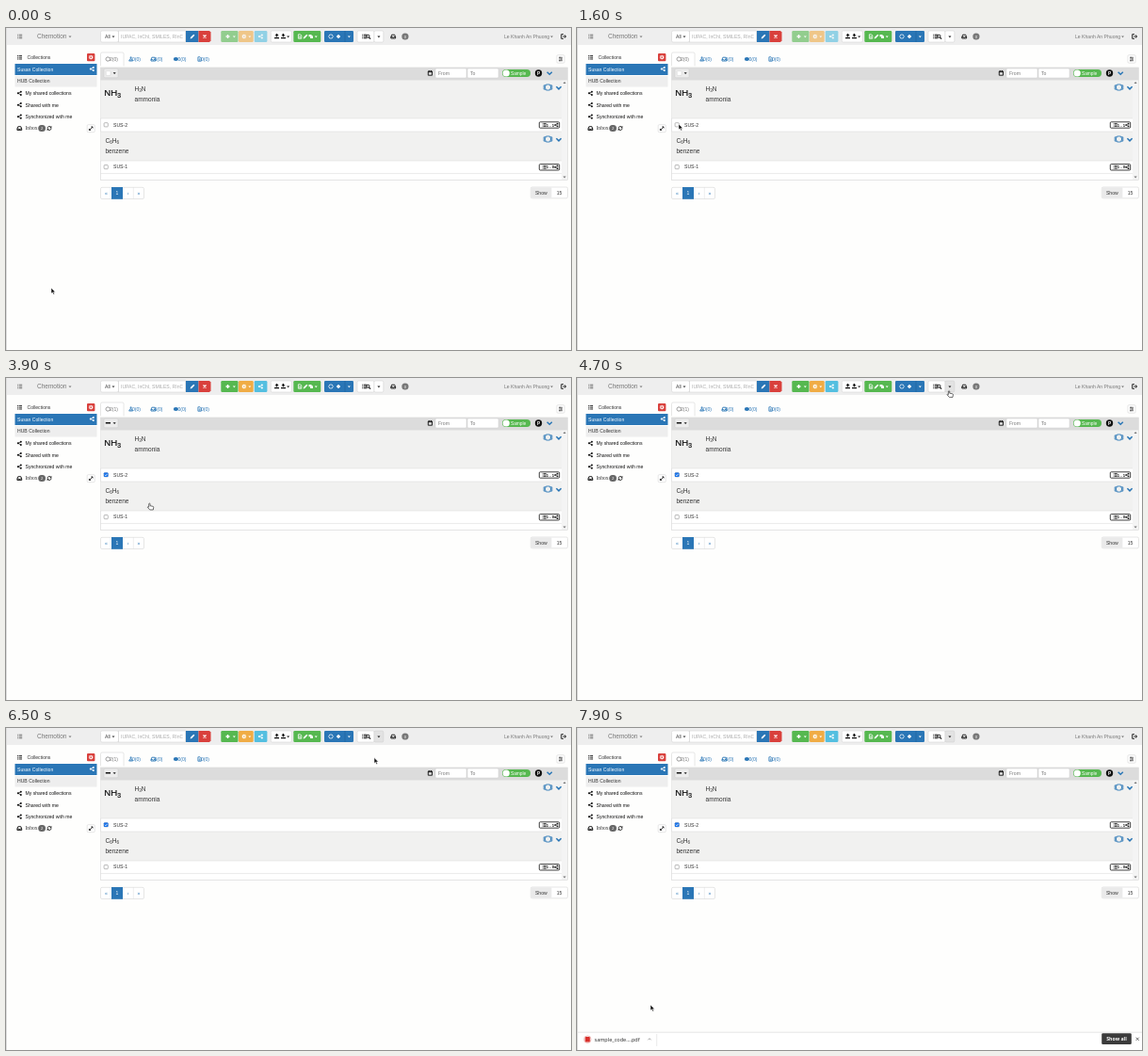
Recreate the animation shown at these times as an HTML page. Size 600 by 342 pixels, loop 8000 ms.

```html
<!DOCTYPE html>
<html lang="en">
<head>
<meta charset="utf-8">
<title>Sample labels</title>
<style>
html, body { margin: 0; width: 100%; height: 100%; overflow: hidden; background: #fefefd; }
#stage { display: block; width: 600px; height: 342px; color: #333; fill: currentColor;
  font: 5.1px "Liberation Sans", Arial, sans-serif; }
.line { fill: none; stroke: currentColor; }
.white { color: #fff; }
.blue { color: #2a76b6; }
.gray { color: #777; }
.pale { color: #aaa; }
.dark { color: #111; }
.box { fill: #fff; stroke: #ccc; stroke-width: .5; }
.big { font-size: 6.5px; }
.mid { text-anchor: middle; }
.shelf { font: 5.5px "Noto Sans", sans-serif; }
tspan { font-size: 70%; }
</style>
</head>
<body>
<svg id="stage" viewBox="0 0 600 342">
<defs>
  <path id="caret" d="M-1.5-.8h3L0 .9z"/>
  <path id="chevron" class="line" stroke-width="1.5" d="M-2.6-1.3L0 1.3 2.6-1.3"/>
  <path id="list" class="line" d="M-2.5-1.8h1m.6 0h3.4M-2.5 0h1m.6 0h3.4M-2.5 1.8h1m.6 0h3.4"/>
  <g id="share"><path class="line" stroke-width=".7" d="M1.5-1.6L-1.5 0 1.5 1.6"/>
    <circle cx="1.5" cy="-1.6" r="1"/><circle cx="-1.5" r="1"/><circle cx="1.5" cy="1.6" r="1"/></g>
  <path id="tray" class="line" stroke-width=".9" d="M-2.4.5L-1.5-1.8h3L2.4.5V2h-4.8zh1.6l.4.7h.8l.4-.7h1.6"/>
  <path id="plus" class="line" stroke-width="1.4" d="M-2 0h4M0-2v4"/>
  <path id="cross" class="line" stroke-width="1.3" d="M-1.5-1.5l3 3m0-3l-3 3"/>
  <path id="pencil" d="M-2.4 2.4l.5-1.7L1.2-2.3 2.4-1.2-.7 1.9z"/>
  <path id="sheet" class="line" stroke-width=".8" d="M-1.6-2.2h2.2l1.2 1.2v3.2h-3.4zM-.7 0h1.6m-1.6 1.1h1.6"/>
  <g id="gear"><circle class="line" r="1.4" stroke-width="1.1"/>
    <path class="line" stroke-width=".7" d="M-2.4 0h.8m3.2 0h.8M0-2.4v.8m0 3.2v.8M-1.7-1.7l.6.6m2.2 2.2l.6.6m0-3.4l-.6.6m-2.2 2.2l-.6.6"/></g>
  <path id="refresh" class="line" stroke-width=".9" d="M-2 .1A2 2 0 0 1 1.6-1.2M2-2.2v1.4H.6M2-.1A2 2 0 0 1-1.6 1.2M-2 2.2V.8h1.4"/>
  <path id="ring" class="line" stroke-width=".7" d="M-1.2-2h2.4l1.2 2-1.2 2h-2.4l-1.2-2z"/>
  <path id="flask" class="line" stroke-width=".8" d="M-.7-2.1h1.4M-.4-2v1.6L-2 2h4L.4-.4V-2M-1.2 1.1h2.4"/>
  <path id="molecule" class="line" stroke-width=".9" d="M-2-3h4L3.2 0 2 3h-4L-3.2 0zM-2.4-2.1h-1.9v4.2h1.9M2.4-2.1h1.9v4.2h-1.9"/>
  <g id="tick"><rect class="box" x="-2.1" y="-2.1" width="4.2" height="4.2" rx=".8" style="stroke:#777"/></g>
  <g id="badge"><rect x="-10.7" y="-3.2" width="21.4" height="6.4" rx="1" class="line" fill="#fff" stroke-width=".8"/>
    <use href="#list" x="-6.6" transform="scale(.8)" /><use href="#share" x="8.6" transform="scale(.85)"/></g>
</defs>

<!-- top bar -->
<path fill="#eee" d="M0 0h600v18H0z"/>
<path fill="#ddd" d="M0 0h1v342H0z"/>
<g class="gray">
  <use href="#list" x="14.7" y="9"/>
  <text class="big" x="33" y="11.3">Chemotion</text><use href="#caret" x="68" y="9.3"/>
  <text x="529" y="10.9">Le Khanh An Phuong</text><use href="#caret" x="579.5" y="9.3" transform="translate(0 0)"/>
  <path class="line dark" stroke-width=".9" d="M592 6.7h-2.3v4.6h2.3M591.3 9h3.2m-1.4-1.5l1.6 1.5-1.6 1.5"/>
</g>
<rect class="box" x="100.5" y="3" width="19" height="12" rx="1.5"/>
<text x="105" y="10.9">All</text><use href="#caret" x="114" y="9.3"/>
<rect class="box" x="119.5" y="3" width="71" height="12"/>
<svg x="119" width="68.7" height="18"><text class="pale" x="3" y="10.9">IUPAC, InChI, SMILES, RInChI</text></svg>
<path fill="#2a76b6" d="M191 3h13.5v12H191z"/><path fill="#d9403c" d="M204.5 3H216l1.5 1.5v9L216 15h-11.5z"/>
<g class="white"><use href="#pencil" x="198" y="9"/><use href="#cross" x="211" y="9"/></g>

<g id="actions" class="white">
  <rect x="228.3" y="3" width="18.2" height="12" rx="1.3" fill="#56b850"/>
  <use href="#plus" x="235.5" y="9"/><use href="#caret" x="242.3" y="9.3"/>
  <rect x="247" y="3" width="15.7" height="12" rx="1.3" fill="#f0ac45"/>
  <use href="#gear" x="252.8" y="9"/><use href="#caret" x="258.8" y="9.3"/>
  <rect x="263.7" y="3" width="13.7" height="12" rx="1.3" fill="#54bfe0"/>
  <use href="#share" x="270.4" y="9"/>
</g>

<rect class="box" x="281.3" y="3" width="22" height="12" rx="1.3"/>
<g class="dark">
  <path d="M285 11.3h5v-1.4h-5zM287 9.5V8h-1.4l2-2.3 2 2.3h-1.4v1.5zM292 11.3h5v-1.4h-5zM293.6 6h1.6v1.4h1.3l-2 2.2-2-2.2h1.1z"/>
  <use href="#caret" x="299.7" y="9.3"/>
</g>
<rect x="305.3" y="3" width="29" height="12" rx="1.3" fill="#56b850"/>
<g class="white">
  <use href="#sheet" x="312" y="9"/><use href="#pencil" x="318" y="9"/>
  <path d="M321.5 7h3v1.3h1.4v2.8h-2.8V9.2h-1.6z"/><use href="#caret" x="329.2" y="9.3"/>
</g>
<rect x="338" y="3" width="31" height="12" rx="1.3" fill="#2a76b6"/>
<path class="line" stroke="#1e5c94" stroke-width=".5" d="M360 3v12" style="color:#1e5c94"/>
<g class="white"><use href="#ring" x="345" y="9"/><use href="#plus" x="353" y="9"/><use href="#caret" x="364.3" y="9.3"/></g>
<rect class="box" x="373" y="3" width="18" height="12" rx="1.3"/>
<rect id="labelToggle" class="box" x="391" y="3" width="9.8" height="12" rx="1.3"/>
<g class="dark">
  <use href="#list" x="380.8" y="9"/>
  <path class="line" d="M385.5 10l1.6 1.6" stroke-width="1.1"/><circle class="line" cx="384.4" cy="8.7" r="1.5"/>
  <use href="#caret" x="395.9" y="9.3"/>
  <use href="#tray" x="411.2" y="9"/>
</g>
<circle cx="423.9" cy="9" r="3.6" fill="#777"/><text class="white mid" x="423.9" y="10.6" font-size="4.3">0</text>

<!-- sidebar -->
<use href="#list" x="14.5" y="31.2"/><text x="22.5" y="33">Collections</text>
<rect x="86" y="27" width="8.4" height="8.3" rx="1" fill="#d9403c"/><use class="white" href="#gear" x="90.2" y="31.1"/>
<path fill="#2a76b6" d="M9.5 38h87v12h-87z"/>
<path fill="#eee" d="M9.5 51h87v11.5h-87z"/>
<g class="white"><text x="12" y="46">Susan Collection</text><use href="#share" x="91.3" y="43.5"/></g>
<text x="12" y="58.4">HUB Collection</text>
<g class="dark">
  <use href="#share" x="14.3" y="69.3"/><text x="20.5" y="71.1">My shared collections</text>
  <use href="#share" x="14.3" y="81.7"/><text x="20.5" y="83.5">Shared with me</text>
  <use href="#share" x="14.3" y="94.2"/><text x="20.5" y="96">Synchronized with me</text>
  <use href="#tray" x="14.3" y="106.5"/><use href="#refresh" x="46" y="106.5"/>
</g>
<text x="20.5" y="108.3" font-family="Liberation Serif, serif" font-size="5.6">Inbox</text>
<rect x="34.2" y="103" width="7.8" height="7" rx="3.5" fill="#666"/><text class="white mid" x="38.1" y="108.1" font-size="4.3">2</text>
<rect class="box" x="86.2" y="102.7" width="8" height="8" rx="1"/>
<path class="line dark" stroke-width=".8" d="M88.5 108.4l3.4-3.4M90.4 104.9H92v1.6m-3.6.4v1.6H90"/>

<!-- tabs -->
<path class="box" d="M100.5 40.3V27.5q0-1.5 1.5-1.5h21.5q1.5 0 1.5 1.5v12.8"/>
<g class="gray"><use href="#ring" x="108.2" y="33"/><text id="count" x="110" y="34.8"></text></g>
<g class="blue">
  <use href="#flask" x="132.6" y="33"/><use href="#tray" x="156.4" y="33"/>
  <ellipse cx="180.4" cy="33" rx="2.6" ry="1.9"/><use href="#sheet" x="205.5" y="33"/>
  <text y="34.8"><tspan x="134" font-size="100%" style="font-size:5.1px">0(0)</tspan><tspan x="157.5" style="font-size:5.1px">0(0)</tspan><tspan x="182.5" style="font-size:5.1px">0(0)</tspan><tspan x="207" style="font-size:5.1px">0(0)</tspan></text>
</g>
<rect class="box" x="585" y="28.7" width="8" height="8.5" rx="1"/>
<path class="line" stroke-width=".7" d="M587 31.3h4m-4 1.7h4m-4 1.7h4m-2.8-4v1.2m1.6.5v1.2m-1.8.5v1.2"/>

<!-- sample list -->
<rect class="box" x="100.3" y="42" width="496" height="119.5"/>
<path fill="#dcdcdc" d="M100.5 42h495.6v13H100.5z"/>
<path fill="#f1f1f0" d="M100.5 55H590v41H100.5zM100.5 110H590v31H100.5z"/>
<path fill="#f4f4f4" d="M590 55h6v106h-6z"/>
<path class="line" stroke-width=".5" style="color:#d4d4d4" d="M100.5 55.2H596M100.5 96H590M100.5 110H590M100.5 141H590M100.5 154.6H590"/>
<path fill="#777" d="M591.5 59l1.6-2 1.6 2zM591.5 157.4l1.6 2 1.6-2z"/>
<rect class="box" x="104" y="43.2" width="15" height="9.6" rx="1" style="fill:#ececec"/>
<rect id="noneMark" class="box" x="106.2" y="45.6" width="4.8" height="4.8" rx=".6"/>
<path id="someMark" class="dark" d="M105.8 47h5.2v1.5h-5.2z"/>
<use class="dark" href="#caret" x="115.2" y="48"/>
<path class="dark line" stroke-width=".9" d="M448.3 46h4.2v4.2h-4.2zM448.3 46.7h4.2M449.3 45v1m2.2-1v1"/>
<rect class="box" x="456" y="43" width="33" height="10" rx="1"/><rect class="box" x="490" y="43" width="33" height="10" rx="1"/>
<g class="gray"><text x="459" y="49.6">From</text><text x="493" y="49.6">To</text></g>
<rect x="527" y="44" width="30" height="8" rx="4" fill="#56b850"/><circle class="white" cx="531.2" cy="48" r="3.6"/>
<text class="white" x="536" y="49.7" font-size="4.8">Sample</text>
<circle class="dark" cx="565.5" cy="48" r="3.7"/><text class="white mid" x="565.6" y="49.7" font-size="4.8" font-weight="bold">P</text>
<g class="blue">
  <use href="#chevron" x="577.2" y="48"/><use href="#molecule" x="575.5" y="63"/><use href="#chevron" x="587" y="63.6"/>
  <use href="#molecule" x="575.5" y="118"/><use href="#chevron" x="587" y="118.6"/>
</g>
<text class="dark" x="104.3" y="72" font-size="9.6" stroke="#111" stroke-width=".2">NH<tspan dy="1.6">3</tspan></text>
<g class="big">
  <text x="136.6" y="67">H<tspan dy="1.2">3</tspan><tspan dy="-1.2" style="font-size:6.5px">N</tspan></text>
  <text x="136.6" y="77.7">ammonia</text>
  <text x="105.5" y="122.2">C<tspan dy="1.2">6</tspan><tspan dy="-1.2" style="font-size:6.5px">H</tspan><tspan dy="1.2">6</tspan></text>
  <text x="105.5" y="132.7">benzene</text>
</g>
<use href="#tick" x="106.2" y="102.8"/><use href="#tick" x="106.2" y="147.6"/>
<g id="checked"><rect x="103.9" y="100.5" width="4.6" height="4.6" rx=".8" fill="#1a73e8"/>
  <path class="line white" stroke-width=".8" d="M104.9 102.8l1 1 1.7-2"/></g>
<text x="114" y="104.7">SUS-2</text><text x="114" y="149.4">SUS-1</text>
<g class="dark">
  <use href="#badge" x="577" y="103"/><use href="#badge" x="577" y="147.8"/>
  <g class="mid" font-size="4.2" font-weight="bold"><text x="578" y="104.6">1 - 1</text><text x="578" y="149.4">1 - 0</text></g>
</g>

<!-- paging -->
<rect class="box" x="100.5" y="169.3" width="46" height="12.2" rx="1.5"/>
<path class="line" stroke-width=".5" style="color:#ddd" d="M135.3 169.3v12.2"/>
<path fill="#2a76b6" d="M112 169h12v12.8h-12z"/>
<g class="mid blue"><text x="106.3" y="177">«</text><text class="white" x="118" y="177">1</text><text x="129.5" y="177">›</text><text x="141" y="177">»</text></g>
<rect class="box" x="557.3" y="169" width="39.2" height="11.8" rx="1.5"/>
<path fill="#eaeaea" d="M557.6 169.3h21.8v11.2h-21.8z"/>
<g class="mid"><text x="568.3" y="176.6">Show</text><text x="587.6" y="176.6">15</text></g>

<g id="menu">
  <rect x="373" y="16.6" width="57" height="22.6" rx="1.5" fill="#000" opacity=".12"/>
  <rect class="box" x="372.8" y="16" width="56" height="22" rx="1.5"/>
  <rect id="hover" x="373.1" width="55.4" height="9.3" fill="#eee"/>
  <text x="379.5" y="24.2">Small Label</text><text x="379.5" y="33.7">Large Label</text>
</g>

<g id="shelf" class="shelf">
  <path fill="#fff" d="M1 323h599v19H1z"/><path fill="#dcdcdc" d="M1 322.8h599v.6H1z"/>
  <circle class="line" cx="11.2" cy="330.7" r="3.8" stroke-width=".7" style="color:#e9a3a0"/>
  <rect id="fileIcon" x="8.6" width="5.2" rx="1" fill="#d92f2b"/>
  <text id="fileName" x="18.5" y="332.5"></text>
  <g id="itemEnd" class="gray"><path class="line" stroke-width=".7" d="M-1.6 331.3L0 329.7l1.6 1.6"/>
    <path fill="#d5d5d5" d="M7.6 325h.5v13h-.5z"/></g>
  <rect x="557.2" y="324.3" width="31.6" height="11.8" rx="1.3" fill="#3b3b3b"/>
  <text class="white mid" x="573" y="332.1" font-size="5.2" font-weight="bold">Show all</text>
  <path class="line" stroke-width=".7" d="M593.6 328.7l3.2 3.2m0-3.2l-3.2 3.2"/>
</g>
<path id="download" fill="#2a7fd6" d="M12.2 312.5h3.6v3.6h3L14 320.8l-4.8-4.7h3zM8.3 324.5h11.4v1.5H8.3z"/>

<g id="cursor" stroke="#fff" stroke-width=".5" class="dark">
  <path id="arrow" d="M0 0v6l1.4-1.2 1 2.2 1.1-.5-1-2.1h1.9z"/>
  <path id="hand" style="fill:#fff;stroke:#111;stroke-width:.6" d="M-.6.5q.7-.8 1.3 0v2.2l3 .6q.8.2.7 1L4 6.9H.4L-2 4.3q.1-.8.8-.6l.6.5z"/>
</g>
</svg>

<script>
const LOOP = 8000, STEP = 100;
const el = id => document.getElementById(id);
const show = (id, on) => el(id).style.display = on ? '' : 'none';
const clamp = v => Math.max(0, Math.min(1, v));

// pointer stops: time, x, y
const stops = [
  [0, 48, 276], [900, 102, 170], [1100, 108, 102], [2900, 108, 102], [3000, 108.5, 107.3],
  [3200, 96, 127], [3500, 122, 148], [3800, 122, 148], [4700, 395, 13.5], [5500, 395, 13.5],
  [6000, 391, 31.5], [6600, 391, 31.5], [6700, 391, 33], [7000, 391, 33],
  [7500, 208, 182], [7900, 78, 294], [LOOP, 78, 294]
];

function pointerAt(t) {
  const i = stops.findIndex(s => s[0] > t);
  const [t0, x0, y0] = stops[i - 1], [t1, x1, y1] = stops[i];
  const k = (t - t0) / (t1 - t0);
  return [x0 + (x1 - x0) * k, y0 + (y1 - y0) * k];
}

function draw(t) {
  const [x, y] = pointerAt(t);
  const selected = t >= 2200;
  show('checked', t >= 2000);
  show('someMark', selected);
  show('noneMark', !selected);
  el('actions').style.opacity = selected ? 1 : .6;
  el('count').textContent = selected ? '2(1)' : '2(0)';
  el('labelToggle').style.fill = t >= 4700 ? '#e2e2e2' : '#fff';

  show('menu', t >= 5200 && t < 6500);
  show('hover', y > 18);
  el('hover').setAttribute('y', y < 27 ? 17.8 : 27.2);

  const saved = t >= 7300;
  show('shelf', t >= 6700);
  el('shelf').setAttribute('transform', `translate(0 ${19 * (1 - clamp((t - 6600) / 200))})`);
  el('fileName').textContent = saved ? 'sample_code….pdf' : 'sample…';
  el('itemEnd').setAttribute('transform', `translate(${saved ? 77 : 53.5} 0)`);
  el('fileIcon').setAttribute('y', saved ? 328 : 329.3);
  el('fileIcon').setAttribute('height', saved ? 5.4 : 3.2);

  const drop = clamp((t - 6700) / 600);
  el('download').setAttribute('transform', `translate(0 ${14 * (drop - .5)})`);
  el('download').style.opacity = 1 - 4 * (drop - .5) ** 2;

  const hand = t >= 3000 && t < 4400 || t >= 4600 && t < 6500;
  show('hand', hand);
  show('arrow', !hand);
  el('cursor').setAttribute('transform', `translate(${x} ${y})`);
}

function tick() {
  draw(Math.floor(performance.now() % LOOP / STEP) * STEP);
  requestAnimationFrame(tick);
}
tick();
</script>
</body>
</html>
```
